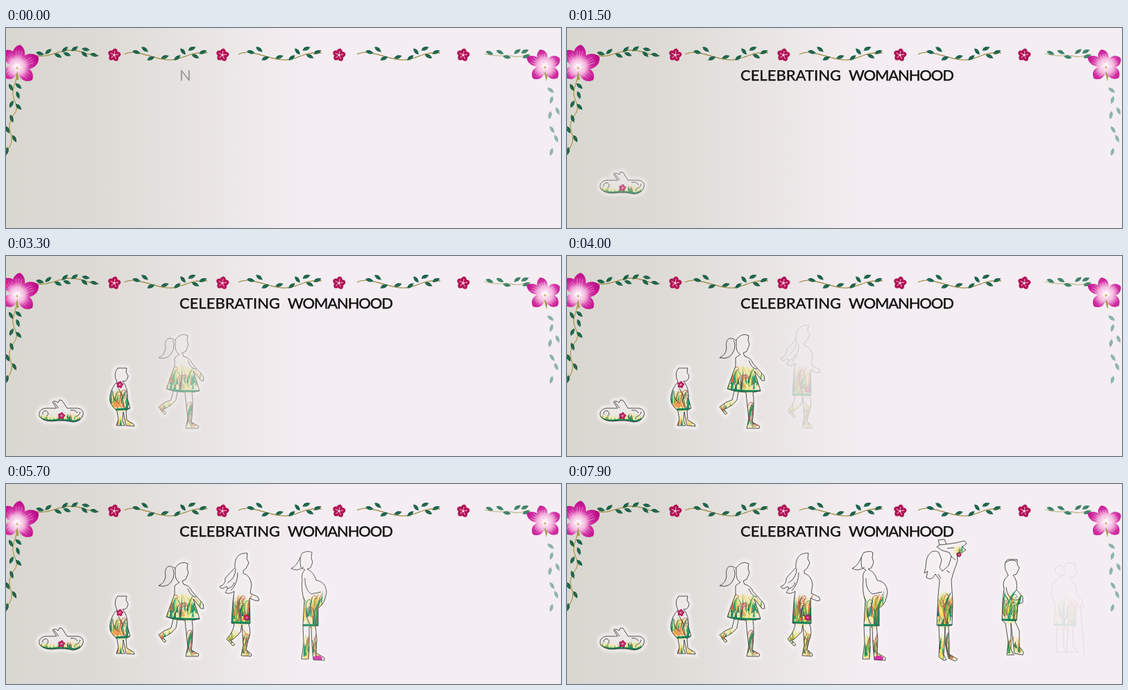
An HTML page for the animation above (8 s loop, 800x289 px).

```html
<!DOCTYPE html>
<html lang="en">
<meta charset="utf-8">
<title>Celebrating Womanhood</title>
<style>
  html, body { margin: 0; height: 100%; overflow: hidden; }
  svg { display: block; width: 800px; height: 289px; }
  text { font: 500 22px "Comic Sans MS", "Comic Neue", Lato, sans-serif; fill: #111; stroke: #111; stroke-width: .25; }
  tspan { fill: #999; stroke: none; font-weight: 400; }
</style>
<svg id="stage" viewBox="0 0 800 289">
  <defs>
    <linearGradient id="paper">
      <stop offset="0" stop-color="#d9d7d0"/><stop offset=".16" stop-color="#dddad5"/>
      <stop offset=".33" stop-color="#e7e3e1"/><stop offset=".48" stop-color="#f1ebee"/>
      <stop offset=".56" stop-color="#f4edf2"/><stop offset="1" stop-color="#f4eef2"/>
    </linearGradient>
    <radialGradient id="petal" gradientUnits="userSpaceOnUse" cx="0" cy="0" r="31">
      <stop offset=".1" stop-color="#fff4fa"/><stop offset=".36" stop-color="#f3b3dc"/>
      <stop offset=".6" stop-color="#d332a5"/><stop offset="1" stop-color="#bb0b88"/>
    </radialGradient>
    <filter id="soft" x="-30%" y="-30%" width="160%" height="160%"><feGaussianBlur stdDeviation="1.6"/></filter>
  </defs>
  <rect width="800" height="289" fill="url(#paper)"/>
  <g id="border"></g>
  <g id="figures"></g>
  <text id="first" x="250" y="76"></text>
  <text id="second" x="406" y="76" letter-spacing="-1.2"></text>
</svg>
<script>
const byId = id => document.getElementById(id);
const path = (d, attrs) => `<path d="${d}" ${attrs}/>`;
const group = (x, y, turn, body) => `<g transform="translate(${x} ${y}) rotate(${turn})">${body}</g>`;

let seed = 11;
const rand = (a = 0, b = 1) => {
  seed = (seed * 16807) % 2147483647;
  return a + (b - a) * seed / 2147483647;
};
const pick = list => list[Math.floor(rand(0, list.length))];

// ---- floral border ----
const stem = (d, color = '#a4914d') => path(d, `fill="none" stroke="${color}" stroke-width="1.3"`);

// spots: x, y, angle for each leaf
function leaves(spots, color = '#125a42') {
  let out = '';
  for (let i = 0; i < spots.length; i += 3) {
    out += group(spots[i], spots[i + 1], spots[i + 2],
      path('M-6 0Q-1-5.4 6 0Q0 4.6-6 0Z', `fill="${color}"`) +
      path('M-5 0L5 0', 'stroke="#5f9b78" stroke-width=".5"'));
  }
  return out;
}

const petal = (turn, len, w, fill) => group(0, 0, turn,
  path(`M0 0C${len * .3} ${-w} ${len * .85} ${-w} ${len} 0C${len * .85} ${w} ${len * .3} ${w} 0 0Z`, `fill="${fill}"`));

function smallFlower(x, y, size = 1) {
  let out = '';
  for (let i = 0; i < 5; i++) {
    out += petal(i * 72 - 80, 9.6, 5.2, '#b11354') +
      group(0, 0, i * 72 - 80, path('M1 0L6 0', 'stroke="#efa0c2" stroke-width="1.1"'));
  }
  return `<g transform="translate(${x} ${y}) scale(${size})">${out}<circle r="1.6" fill="#fbe3e8"/></g>`;
}

function bigFlower(x, y, petals) {
  let out = '';
  for (const [turn, len, w] of petals) {
    out += petal(turn, len, w, 'url(#petal)');
    for (const bend of [-4, 0, 4]) {
      out += group(0, 0, turn, path(`M4 0Q${len * .4} ${bend} ${len * .72} ${bend}`,
        'fill="none" stroke="#f6c5e5" stroke-width=".7" opacity=".7"'));
    }
  }
  return group(x, y, 0, out + '<circle r="4" fill="#fff3f8"/><circle cy="2" r="1.8" fill="#d8b27c"/>');
}

const vine = x => group(x, 0, 0,
  stem('M-2 38Q8 33 22 37C42 41 52 47 67 46C88 44 91 34 118 36') +
  leaves([16, 35, 15, 28, 31, 35, 37, 44, -25, 57, 42, -20, 75, 43, -40, 83, 34, 50, 96, 30, -25, 101, 41, 25, 112, 35, -25]));

byId('border').innerHTML =
  stem('M40 39C62 45 74 32 92 32C111 32 116 40 134 40') +
  leaves([49, 37, 15, 61, 34, -40, 75, 40, 25, 85, 31, -45, 88, 38, 20, 99, 30, -35, 115, 31, 10, 113, 38, 40, 127, 39, 15]) +
  [172, 337, 508].map(vine).join('') +
  stem('M689 37C705 43 720 38 732 41S748 37 756 38', '#c3bd94') +
  leaves([697, 36, 20, 712, 35, 25, 722, 42, 10, 737, 34, -35, 748, 34, -25, 750, 41, -20], '#397f66') +
  [156, 312, 480, 659].map(x => smallFlower(x, 39)).join('') +
  stem('M16 62C16 80 8 86 10 97C13 112 18 110 14 121C2 138 4 143 8 156C10 169 2 174 0 182', '#b19b45') +
  leaves([7, 86, 60, 18, 84, 40, 17, 97, 70, 8, 110, -65, 18, 114, 45, 8, 131, 70, 2, 147, 60, 12, 160, 60, 1, 178, 100]) +
  `<g opacity=".58">${leaves([785, 90, 35, 786, 104, 105, 795, 120, 65, 784, 126, 100, 787, 147, 55, 793, 160, 65, 786, 179, 105], '#3f8872')}</g>` +
  path('M14 58L17 75', 'stroke="#a8974b" stroke-width="3"') +
  bigFlower(16, 56, [[-125, 29, 12], [140, 24, 12], [41, 29, 12], [-24, 34, 14], [-83, 32, 12]]) +
  path('M774 58L782 61L779 77Z', 'fill="#a59a50"') +
  bigFlower(777, 55, [[-155, 29, 9], [135, 25, 11], [43, 25, 11], [-28, 24, 11], [-106, 25, 10]]);

// ---- figures ----
const greens = ['#157a54', '#23905f', '#2f9f78', '#7fb34a'];
const warms = ['#ecdf5c', '#f1e27a', '#eebb55', '#d8753f'];

function blade(x, y, h, color) {
  const lean = rand(-.4, .4) * h, w = rand(.8, 1.8);
  return path(`M${x - w} ${y}Q${x - lean * .3} ${y - h * .6} ${x + lean} ${y - h}Q${x + w} ${y - h * .5} ${x + w} ${y}Z`, `fill="${color}"`);
}
const curl = (x, y, h) => path(`M${x} ${y}C${x - 8} ${y - h * .5} ${x - 5} ${y - h} ${x} ${y - h}C${x + 5} ${y - h} ${x + 4} ${y - h + 7} ${x} ${y - h + 5}`,
  `fill="none" stroke="${pick(['#c4603c', '#b8435c', '#2a8a60'])}" stroke-width=".9"`);

// a patch of plants growing from base between x0 and x1
function garden([x0, x1, base, h, count]) {
  let out = `<ellipse cx="${(x0 + x1) / 2}" cy="${base - h * .35}" rx="${(x1 - x0) / 2}" ry="${h * .45}" fill="#efe45c" opacity=".38" filter="url(#soft)"/>`;
  for (let i = 0; i < count; i++) {
    const color = pick(rand() < .6 ? greens : warms);
    out += blade(rand(x0, x1), base - rand(0, h * .35), h * rand(.25, .65), color);
  }
  if (h > 28 && x1 - x0 > 12) {
    for (let i = 0; i < 4; i++) out += curl(rand(x0 + 5, x1 - 3), base - rand(0, 9), h * rand(.4, .75));
  }
  return out;
}

const people = [
  { // newborn
    body: 'M49 233C45 226 51 220 58 220L73 220L67 211Q70 208 75 212L77 208Q81 207 83 212L88 220L104 220Q113 222 111 230Q108 239 97 240Q85 237 74 238Q57 241 49 233Z',
    lines: 'M53 229A4 4 0 1 1 59 231M69 211L76 220M93 223Q101 222 103 227M100 232Q106 231 107 225',
    gardens: [[48, 72, 239, 10, 18], [72, 111, 240, 14, 30]],
    hem: 'M50 235Q60 240 74 237Q90 237 99 239L108 236', flowers: [[80, 231, .55]]
  },
  { // toddler
    body: 'M160 182Q154 170 161 162L174 162L173 168L176 173Q175 182 168 181Q176 190 175 206L179 220L173 223L174 237L184 243L185 246L173 245L169 225L168 238L171 245L159 245L162 236L160 224Q147 213 150 202Q152 190 160 182Z',
    lines: 'M154 195Q153 208 163 213M162 191L169 205',
    gardens: [[150, 178, 223, 36, 34], [160, 170, 245, 18, 8], [171, 184, 245, 18, 8]],
    hem: 'M158 222L178 221', flowers: [[164, 186, .55]], blooms: [[160, 214]]
  },
  { // girl
    body: 'M244 121Q252 110 262 115L261 122L263 128L259 138L254 140L256 145Q265 147 268 155L284 173L285 180L281 180L270 166L279 195L268 197C270 209 269 219 268 232L267 240L278 246L277 249L259 249L262 235L260 217L258 197L247 196L245 208Q239 216 232 219L226 222L231 227L228 229L220 218Q229 210 238 208L241 195L231 192L243 159L243 147L250 142Q245 140 244 132Z',
    lines: 'M244 122C232 114 228 123 230 133Q229 143 220 147Q235 151 241 136Q243 126 240 122M262 151Q267 164 274 163',
    gardens: [[230, 279, 195, 44, 50], [221, 246, 227, 24, 18], [258, 278, 249, 45, 20]],
    hem: 'M231 193Q251 196 279 195'
  },
  { // young woman
    body: 'M330 121C329 106 336 99 348 100L347 108L350 114L346 122L342 125L342 129Q352 132 354 145L352 158L363 163L365 168L361 169L351 165L352 201L350 203Q354 215 349 226L346 239L354 246L353 249L339 248L342 233L341 217L340 203L338 214L329 223L324 226L330 232L327 234L318 224Q328 213 329 202L325 201L327 170L329 155Q322 160 316 157Q321 151 318 148Q310 154 308 148Q317 145 316 136Q321 130 330 121Z',
    lines: 'M331 122Q331 136 319 143M334 128Q334 144 324 154M329 142Q327 150 319 151',
    gardens: [[325, 353, 201, 50, 52], [318, 338, 232, 26, 15], [339, 354, 248, 43, 20]],
    hem: 'M325 200L352 201', flowers: [[347, 193, .5]]
  },
  { // expecting
    body: 'M425 121Q422 105 428 99Q437 96 441 99L440 107L442 113L439 121L434 123Q444 127 447 139Q461 141 462 156Q460 174 450 179L450 205L446 205L448 224L447 244L459 251L459 255L443 254L441 233L440 206L437 207L437 239L436 253L426 253L429 230L428 204L430 169Q425 154 427 139Q425 129 431 124Z',
    lines: 'M424 106Q420 118 411 122Q420 127 429 120M431 136Q430 152 440 159L454 156',
    gardens: [[428, 461, 205, 54, 56], [427, 437, 252, 42, 18], [441, 458, 252, 42, 18]],
    hem: 'M428 204L450 204', spots: [[449, 252]]
  },
  { // mother with child
    body: 'M518 110C522 96 530 95 536 99L540 110L537 121L541 126L550 118L554 105L551 99L541 96L533 91L537 88L535 81L544 80L547 87L561 85L573 82L576 86L570 91L575 95L570 99L562 100L563 111L557 128L554 139L556 171L555 204L550 205L551 230L551 246L563 253L560 256L550 252L545 231L545 206L543 247L547 254L543 255L536 250L537 230L536 205L533 204L535 161L537 139L531 130Q526 141 518 135L520 126L515 129Q518 119 518 110Z',
    lines: 'M553 104L560 110M548 93L558 92M537 88L547 87M547 125L552 128M539 137L535 130',
    gardens: [[534, 556, 204, 60, 50], [536, 544, 254, 46, 18], [545, 562, 254, 46, 20], [557, 573, 102, 16, 9]],
    hem: 'M534 204L556 204', flowers: [[565, 102, .4]]
  },
  { // older woman
    body: 'M632 124Q629 112 636 109L649 109L649 116L652 121L648 130L643 132Q650 139 648 153L657 163L657 171L650 174L648 197L646 199L652 212L652 235L658 243L657 247L645 245L642 220L640 201L640 239L644 247L634 247L636 229L632 201L627 197L628 170L630 151Q626 141 636 132Z',
    lines: 'M632 114Q640 107 648 112M633 149Q634 164 646 168L654 166',
    gardens: [[627, 650, 198, 49, 44], [634, 642, 246, 28, 12], [643, 657, 245, 28, 12]],
    hem: 'M627 196L649 197'
  },
  { // grandmother
    body: 'M718 130Q713 118 722 114L733 115L732 122L736 127L732 134L725 136Q735 145 734 158L743 170L741 178L733 176L734 204L729 207L730 236L737 243L720 243L722 207L716 207L716 235L720 243L705 243L707 206L701 203Q705 184 703 171Q694 156 701 142Q710 134 718 130Z',
    lines: 'M715 121Q707 113 703 124Q704 134 716 131M740 178L746 246M741 175Q747 174 745 181',
    gardens: [[702, 734, 204, 46, 30]],
    hem: 'M702 203L734 204'
  }
];

byId('figures').innerHTML = people.map((p, i) => `
  <g opacity="0">
    ${path(p.body, 'fill="#f4f0f0" stroke="#f7f3f4" stroke-width="10" stroke-linejoin="round" opacity=".62" filter="url(#soft)"')}
    <clipPath id="shape${i}">${path(p.body, '')}</clipPath>
    <g clip-path="url(#shape${i})">
      ${p.gardens.map(garden).join('')}
      ${(p.blooms || []).map(([x, y]) => `<circle cx="${x}" cy="${y}" r="5" fill="#ef9a58"/>`).join('')}
      ${(p.spots || []).map(([x, y]) => `<ellipse cx="${x}" cy="${y}" rx="7" ry="4" fill="#d631a8"/>`).join('')}
      ${path(p.hem, 'fill="none" stroke="#178057" stroke-width="3"')}
    </g>
    ${(p.flowers || []).map(f => smallFlower(...f)).join('')}
    ${path(p.body + p.lines, 'fill="none" stroke="#343434" stroke-width=".85" stroke-linejoin="round"')}
  </g>`).join('');

// ---- timeline ----
const layers = [...byId('figures').children];
const title = 'CELEBRATING WOMANHOOD';
const decoys = 'NSKRPDUHXQA BTGERLVCM';
const LOOP = 8000, STEP = 100, FADE = 1000, FIRST = 800;

function draw(now) {
  const t = Math.floor(now % LOOP / STEP) * STEP;
  const typed = Math.floor(t * 3 / 200);
  const ghost = typed < title.length ? `<tspan>${decoys[typed]}</tspan>` : '';
  byId('first').innerHTML = title.slice(0, Math.min(typed, 11)) + (typed < 11 ? ghost : '');
  byId('second').innerHTML = title.slice(12, Math.max(typed, 12)) + (typed > 11 ? ghost : '');
  layers.forEach((layer, i) => {
    layer.setAttribute('opacity', Math.max(0, Math.min(1, (t - FIRST - i * 1000) / FADE)));
  });
}

const start = performance.now();
function tick() {
  draw(performance.now() - start);
  requestAnimationFrame(tick);
}
tick();
</script>
</html>
```
